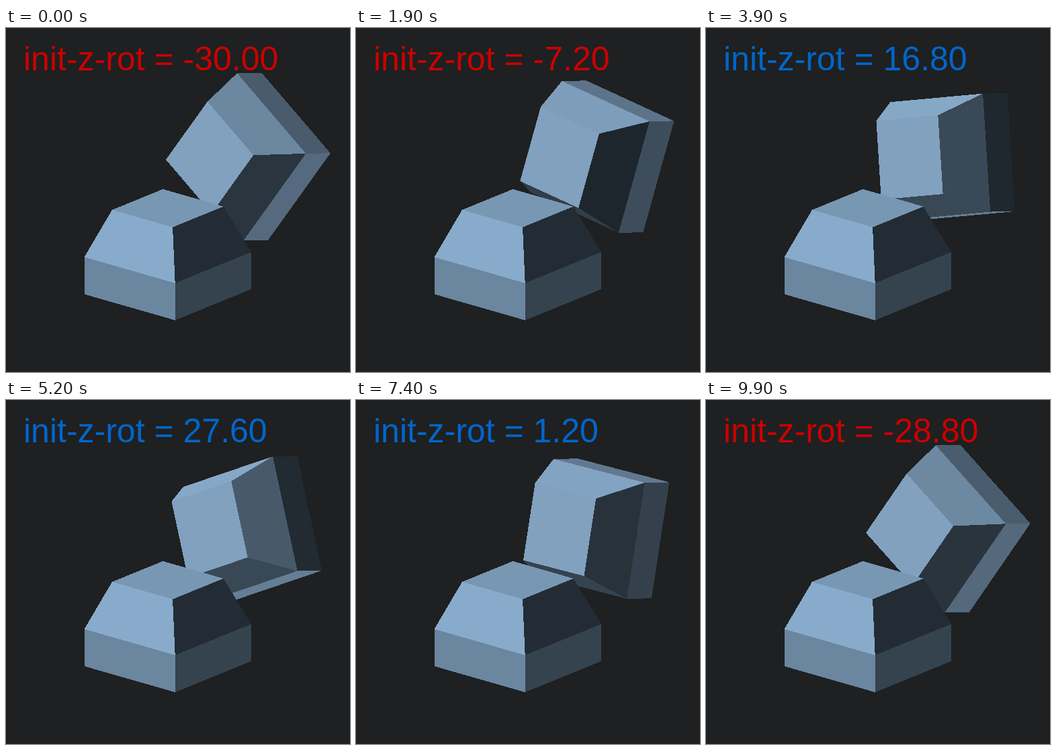
An HTML page for the animation above (10 s loop, 512 px wide and 512 px high).

```html
<!DOCTYPE html>
<html>
<head>
<meta charset="utf-8">
<style>
html, body { margin: 0; width: 100%; height: 100%; overflow: hidden; background: #1e2021; }
svg { display: block; }
text { font: 50px "Liberation Sans", Arial, sans-serif; }
</style>
</head>
<body>
<svg width="512" height="512" viewBox="0 0 512 512">
  <g id="blocks" shape-rendering="crispEdges"></g>
  <text id="label" x="26" y="63"></text>
</svg>
<script>
const blocks = document.getElementById('blocks');
const label = document.getElementById('label');
const rad = Math.PI / 180;
const unit = 58.8;
const dot = (a, b) => a[0] * b[0] + a[1] * b[1] + a[2] * b[2];

// Orthographic camera
const ca = Math.cos(40 * rad), sa = Math.sin(40 * rad);
const ce = Math.cos(20 * rad), se = Math.sin(20 * rad);
const right = [ca, sa, 0];
const up = [-sa * se, ca * se, ce];
const toViewer = [sa * ce, -ca * ce, se];

// Two-sided diffuse light on top of an ambient level
const light = [-41, -121, 141], ambient = 38;
const tint = [0.673, 0.843, 1];

function shade(normal) {
  const level = ambient + Math.abs(dot(normal, light));
  return `rgb(${tint.map(c => Math.round(c * level))})`;
}

// Block: square base with a tapered top; each ring is [half width, height]
const rings = [[1.5, 0], [1.5, 1], [1, 2.25]];
const corner = ([w, z], i) => {
  const a = (i * 90 - 45) * rad;
  return [w * Math.SQRT2 * Math.cos(a), w * Math.SQRT2 * Math.sin(a), z];
};
const faces = [
  { normal: [0, 0, 1], points: [0, 1, 2, 3].map(i => corner(rings[2], i)) },
  { normal: [0, 0, -1], points: [0, 1, 2, 3].map(i => corner(rings[0], i)) }
];
for (let r = 0; r < 2; r++) {
  const run = rings[r][0] - rings[r + 1][0], rise = rings[r + 1][1] - rings[r][1];
  const len = Math.hypot(run, rise);
  for (let i = 0; i < 4; i++) {
    const a = i * 90 * rad;
    faces.push({
      normal: [Math.cos(a) * rise / len, Math.sin(a) * rise / len, run / len],
      points: [corner(rings[r], i), corner(rings[r], i + 1),
               corner(rings[r + 1], i + 1), corner(rings[r + 1], i)]
    });
  }
}

// Spin about z, then tilt about x
function rotate([x, y, z], spin, tilt) {
  const cs = Math.cos(spin * rad), ss = Math.sin(spin * rad);
  const ct = Math.cos(tilt * rad), st = Math.sin(tilt * rad);
  const y2 = x * ss + y * cs;
  return [x * cs - y * ss, y2 * ct - z * st, y2 * st + z * ct];
}

function block(ox, oy, spin, tilt) {
  return faces.map(({ normal, points }) => {
    const n = rotate(normal, spin, tilt);
    if (dot(n, toViewer) <= 0) return '';
    const outline = points.map(point => {
      const p = rotate(point, spin, tilt);
      return [ox + unit * dot(p, right), oy - unit * dot(p, up)];
    });
    return `<polygon points="${outline.join(' ')}" fill="${shade(n)}"/>`;
  }).join('');
}

function draw() {
  const step = Math.floor(performance.now() / 100) % 100;
  const angle = (12 * Math.min(step, 100 - step) - 300) / 10;
  blocks.innerHTML = block(385.2, 191.3, angle, 75) + block(240.8, 392.5, 0, 0);
  label.textContent = 'init-z-rot = ' + angle.toFixed(2);
  label.setAttribute('fill', angle < 0 ? '#cc0000' : '#0066cc');
  requestAnimationFrame(draw);
}
draw();
</script>
</body>
</html>
```
